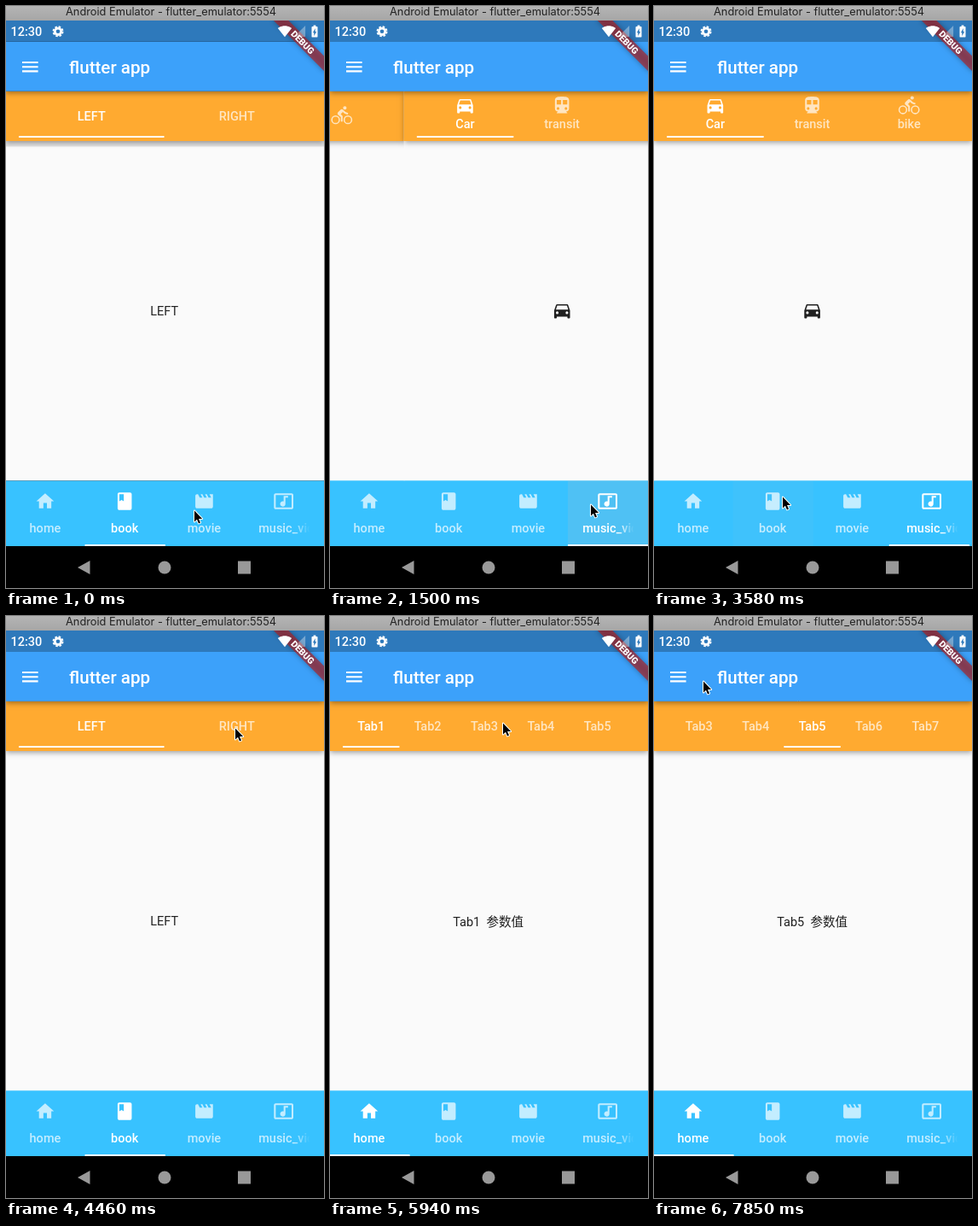
Recreate the animation shown at these times as an HTML page with a canvas. Size 373 by 681 pixels, loop 8 s.

```html
<!DOCTYPE html>
<html lang="en">
<head>
<meta charset="utf-8">
<title>flutter app</title>
<style>
html, body { margin: 0; width: 100%; height: 100%; overflow: hidden; background: #000 }
canvas { display: block; width: 373px; height: 681px }
</style>
</head>
<body>
<canvas></canvas>
<script>
const LOOP = 8000, TICK = 148.1, SLIDE = 300, PAGE_LAG = 150;
const W = 372, MID = 185.6, BAR_X = 15, BAR_W = 341, BAR_Y = 99.7, BODY_Y = 158, NAV_Y = 555.5, DOCK_Y = 632;
const FONT = 'Roboto, "Noto Sans CJK SC", "Noto Sans CJK", sans-serif';
const INK = '#202020';

const canvas = document.querySelector('canvas'), g = canvas.getContext('2d');
const ratio = window.devicePixelRatio || 1;
canvas.width = 373 * ratio;
canvas.height = 681 * ratio;

// Icons on a 24 x 24 grid
const icons = {
  home: 'M10 20v-6h4v6h5v-8h3L12 3 2 12h3v8z',
  book: 'M18 2H6c-1.1 0-2 .9-2 2v16c0 1.1.9 2 2 2h12c1.1 0 2-.9 2-2V4c0-1.1-.9-2-2-2zM6 4h5v8l-2.5-1.5L6 12z',
  movie: 'M18 4l2 4h-3l-2-4h-2l2 4h-3l-2-4H8l2 4H7L5 4H4c-1.1 0-2 .9-2 2v12c0 1.1.9 2 2 2h16c1.1 0 2-.9 2-2V4z',
  music_video: 'M21 3H3c-1.1 0-2 .9-2 2v14c0 1.1.9 2 2 2h18c1.1 0 2-.9 2-2V5c0-1.1-.9-2-2-2zm0 16H3V5h18zM8 15c0-1.66 1.34-3 3-3 .35 0 .69.07 1 .18V6h5v2h-3v7.03c-.02 1.64-1.35 2.97-3 2.97s-3-1.34-3-3z',
  Car: 'M18.92 6.01C18.72 5.42 18.16 5 17.5 5h-11c-.66 0-1.21.42-1.42 1.01L3 12v8c0 .55.45 1 1 1h1c.55 0 1-.45 1-1v-1h12v1c0 .55.45 1 1 1h1c.55 0 1-.45 1-1v-8zM5 14.5a1.5 1.5 0 1 0 3 0 1.5 1.5 0 1 0-3 0zm11 0a1.5 1.5 0 1 0 3 0 1.5 1.5 0 1 0-3 0zM5 11l1.5-4.5h11L19 11z',
  transit: 'M12 2c-4.42 0-8 .5-8 4v9.5C4 17.43 5.57 19 7.5 19L6 20.5v.5h12v-.5L16.5 19c1.93 0 3.5-1.57 3.5-3.5V6c0-3.5-3.58-4-8-4zM6 15.5a1.5 1.5 0 1 0 3 0 1.5 1.5 0 1 0-3 0zM11 11H6V6h5zm4 4.5a1.5 1.5 0 1 0 3 0 1.5 1.5 0 1 0-3 0zM18 11h-5V6h5z',
  bike: 'M13.5 3.5a2 2 0 1 0 4 0 2 2 0 1 0-4 0zM0 17a5 5 0 1 0 10 0 5 5 0 1 0-10 0zm1.5 0a3.5 3.5 0 1 1 7 0 3.5 3.5 0 1 1-7 0zM14 17a5 5 0 1 0 10 0 5 5 0 1 0-10 0zm1.5 0a3.5 3.5 0 1 1 7 0 3.5 3.5 0 1 1-7 0zM10.8 10.5l2.4-2.4.8.8c1.3 1.3 3 2.1 5.1 2.1V9c-1.5 0-2.7-.6-3.6-1.5l-1.9-1.9c-.5-.4-1-.6-1.6-.6s-1.1.2-1.4.6L7.8 8.4c-.4.4-.6.9-.6 1.4 0 .6.2 1.1.6 1.4L11 14v5h2v-6.2z',
  menu: 'M3 18h18v-2H3zm0-5h18v-2H3zm0-7v2h18V6z',
  wifi: 'M12 21.5L23.64 7C23.2 6.66 18.7 3 12 3S.81 6.66.36 7z',
  signal: 'M2 22h20V2z',
  battery: 'M15.67 4H14V2h-4v2H8.33C7.6 4 7 4.6 7 5.33v15.33C7 21.4 7.6 22 8.33 22h7.33c.74 0 1.34-.6 1.34-1.33V5.33C17 4.6 16.4 4 15.67 4zM11 20v-5.5H9L13 7v5.5h2z'
};
for (const name in icons) icons[name] = new Path2D(icons[name]);
const arrow = new Path2D('M0 0V13L3 10.2 5 14.9 7 14 5 9.4H9.1z');

// Each track: [tap time, chosen index]
const sections = ['home', 'book', 'movie', 'music_video'];
const sectionTaps = [[-LOOP, 1], [150, 2], [1206, 3], [3560, 1], [5215, 0]];
const rides = ['Car', 'transit', 'bike'];
const pages = [
  { tabs: Array.from({ length: 8 }, (_, i) => 'Tab' + (i + 1)), size: 66.4, taps: [[-LOOP, 0], [6140, 2], [7410, 4]] },
  { tabs: ['LEFT', 'RIGHT'], taps: [[-LOOP, 0], [4600, 1]] },
  { tabs: rides, icon: true, taps: [[-LOOP, 0]] },
  { tabs: rides, icon: true, label: true, taps: [[-LOOP, 0], [2077, 1], [2480, 2], [2880, 0]] }
];
// time, x, y of the pointer
const pointer = [
  [0, 220, 589], [450, 220, 589], [1000, 305, 582], [1550, 305, 582], [2020, 190, 141], [2200, 192, 141],
  [2385, 256, 141], [2450, 285, 138], [2560, 285, 138], [2800, 80, 138], [2960, 80, 138], [3280, 140, 592],
  [3500, 150, 573], [3700, 150, 573], [4300, 268, 130], [4700, 268, 130], [5150, 46, 582], [5300, 46, 582],
  [5640, 226, 150], [5939, 202, 124], [6350, 202, 124], [6850, 350, 126], [7260, 336, 130], [7540, 336, 130],
  [7850, 57, 75], [LOOP, 57, 75]
];

const clamp = v => Math.max(0, Math.min(1, v));
const mix = (a, b, k) => a + (b - a) * k;

// cubic-bezier(.25, .1, .25, 1)
function ease(x) {
  if (x <= 0 || x >= 1) return clamp(x);
  let lo = 0, hi = 1, u;
  for (let i = 0; i < 20; i++) {
    u = (lo + hi) / 2;
    if (.75 * u * (1 - u) + u ** 3 < x) lo = u; else hi = u;
  }
  return .3 * u * (1 - u) ** 2 + 3 * u * u * (1 - u) + u ** 3;
}

function follow(taps, t) {
  let i = taps.length - 1;
  while (taps[i][0] > t) i--;
  const [at, to] = taps[i], from = i ? taps[i - 1][1] : to;
  const next = taps[i + 1];
  const glow = c => Math.min(clamp((t - c + 20) / 100), clamp((c + 430 - t) / 130));
  const early = next && t > next[0] - 20;
  return {
    from, to,
    mark: ease((t - at) / SLIDE),
    page: ease((t - at - PAGE_LAG) / SLIDE),
    hot: early ? next[1] : to,
    glow: early ? glow(next[0]) : glow(at)
  };
}

function rect(x, y, w, h, color) {
  g.fillStyle = color;
  g.fillRect(x, y, w, h);
}

function text(str, x, y, font, color, align = 'center') {
  g.font = font;
  g.textAlign = align;
  g.fillStyle = color;
  g.fillText(str, x, y);
}

function icon(name, x, y, color, scale = 31 / 30) {
  g.save();
  g.translate(x, y);
  g.scale(scale, scale);
  g.translate(-12, -12);
  g.fillStyle = color;
  g.fill(icons[name], 'evenodd');
  g.restore();
}

function clipped(x, y, w, h, draw) {
  g.save();
  g.beginPath();
  g.rect(x, y, w, h);
  g.clip();
  draw();
  g.restore();
}

function raised(x, y, w, h, color) {
  g.save();
  g.shadowColor = 'rgba(0,0,0,.36)';
  g.shadowBlur = 6 * ratio;
  g.shadowOffsetY = 2 * ratio;
  rect(x, y, w, h, color);
  g.restore();
}

// Strength of a tab's white while the choice moves
function tint(s, i) {
  const on = (s.to === i ? s.mark : 0) + (s.from === i ? 1 - s.mark : 0);
  return `rgba(255,255,255,${.7 + .3 * clamp(on)})`;
}

const pressed = s => `rgba(188,188,188,${.17 * s.glow})`;

// Two neighbours pass by, the lower index painted first
function slide(s, draw) {
  if (s.from === s.to || s.page === 1) return draw(s.to, 0);
  const dir = Math.sign(s.to - s.from);
  const views = [[s.from, -dir * W * s.page], [s.to, dir * W * (1 - s.page)]];
  views.sort((a, b) => a[0] - b[0]).forEach(v => draw(...v));
}

function drawTabs(page, s) {
  const size = page.size || BAR_W / page.tabs.length;
  const scrollOf = i => page.size ? Math.max(0, BAR_X + (i + .5) * size - MID) : 0;
  const scroll = mix(scrollOf(s.from), scrollOf(s.to), s.mark);
  clipped(BAR_X, BAR_Y, BAR_W, 58, () => {
    g.translate(BAR_X - scroll, 0);
    rect(s.hot * size, 103.8, size, 48.2, pressed(s));
    page.tabs.forEach((name, i) => {
      const x = (i + .5) * size, color = tint(s, i);
      if (page.icon) icon(name, x, page.label ? 116.3 : 128, color);
      if (!page.icon || page.label) text(name, x, page.label ? 143 : 133.6, '500 14.5px ' + FONT, color);
    });
    rect(mix(s.from, s.to, s.mark) * size, 152, size, 2, '#fff');
  });
}

function drawPage(page, x, t) {
  const s = follow(page.taps, t);
  g.save();
  g.translate(x, 0);
  rect(0, BAR_Y, W + 1, NAV_Y - BAR_Y, '#fafafa');
  clipped(0, BODY_Y, W + 1, NAV_Y - BODY_Y, () => slide(s, (i, dx) => {
    const name = page.tabs[i];
    if (page.icon) icon(name, MID + dx, 356.3, INK);
    else text(page.size ? name + '\u00a0\u00a0参数值' : name, MID + dx, page.size ? 362.5 : 362, '14.5px ' + FONT, INK);
  }));
  raised(0, BAR_Y, W + 1, BODY_Y - BAR_Y, '#ffaa30');
  drawTabs(page, s);
  g.restore();
}

function drawSections(s) {
  const size = 373 / 4;
  rect(0, NAV_Y, 373, DOCK_Y - NAV_Y, '#38c2ff');
  g.save();
  g.translate(-.7, 0);
  rect(s.hot * size, NAV_Y, size + 1, DOCK_Y - NAV_Y, pressed(s));
  sections.forEach((name, i) => {
    const x = (i + .5) * size, color = tint(s, i);
    icon(name, x, 579.5, color);
    if (i < 3) return text(name, x, 615.5, '500 14.5px ' + FONT, color);
    const fade = g.createLinearGradient(339, 0, 357, 0);
    fade.addColorStop(0, color);
    fade.addColorStop(1, 'rgba(255,255,255,0)');
    text(name, 296.9, 615.5, '500 14.5px ' + FONT, fade, 'left');
  });
  rect(mix(s.from, s.to, s.mark) * size, DOCK_Y - 2, size + 1, 2, '#fff');
  g.restore();
}

function ring(x, y, r, width, dash = []) {
  g.beginPath();
  g.arc(x, y, r, 0, 7);
  g.lineWidth = width;
  g.strokeStyle = '#fff';
  g.setLineDash(dash);
  g.stroke();
  g.setLineDash([]);
}

function drawTop() {
  raised(0, 41.8, 373, BAR_Y - 41.8, '#3ca1fa');
  rect(0, 17, 373, 24.8, '#2e79bb');
  icon('menu', 28.3, 71.2, '#fff');
  text('flutter app', 74, 79, '500 20.6px ' + FONT, '#fff', 'left');

  g.save();
  g.translate(373, 17.7);
  g.rotate(Math.PI / 4);
  g.shadowColor = 'rgba(0,0,0,.5)';
  g.shadowBlur = 6 * ratio;
  rect(-43, 28.9, 86, 12.4, 'rgba(183,28,28,.63)');
  g.shadowColor = 'transparent';
  text('DEBUG', 0, 38.9, '900 10.5px ' + FONT, '#fff');
  g.restore();

  text('12:30', 5.5, 35, '500 14.5px ' + FONT, '#fff', 'left');
  ring(61, 29.8, 3.7, 2.8);
  ring(61, 29.8, 5.6, 1.8, [2.6, 1.798]);
  icon('wifi', 327, 29.5, '#fff', .7);
  icon('signal', 344.5, 29.5, 'rgba(255,255,255,.35)', .66);
  icon('battery', 362, 29.6, '#fff', .7);

  const steel = g.createLinearGradient(0, 0, 0, 17);
  steel.addColorStop(0, '#b4b4b4');
  steel.addColorStop(1, '#a6a6a6');
  rect(0, 0, 373, 17, steel);
  text('Android Emulator - flutter_emulator:5554', 193.5, 11, '12.8px Inter, "Liberation Sans", sans-serif', '#222');
}

function drawDock() {
  rect(0, DOCK_Y, 373, 50, '#000');
  g.fillStyle = '#999';
  g.beginPath();
  g.moveTo(84, 657);
  g.lineTo(98.5, 649);
  g.lineTo(98.5, 665);
  g.fill();
  g.beginPath();
  g.arc(186, 657, 7.5, 0, 7);
  g.fill();
  g.fillRect(272, 649.5, 15, 15);
}

function drawPointer(t) {
  let i = 0;
  while (i < pointer.length - 2 && pointer[i + 1][0] <= t) i++;
  const [a, x0, y0] = pointer[i], [b, x1, y1] = pointer[i + 1];
  const u = clamp((t - a) / (b - a)), k = u * u * (3 - 2 * u);
  g.save();
  g.translate(mix(x0, x1, k) + 1, mix(y0, y1, k) + 1.5);
  g.lineWidth = 2;
  g.lineJoin = 'round';
  g.strokeStyle = '#fff';
  g.stroke(arrow);
  g.fillStyle = '#000';
  g.fill(arrow);
  g.restore();
}

function draw(t) {
  const s = follow(sectionTaps, t);
  g.setTransform(ratio, 0, 0, ratio, 0, 0);
  slide(s, (i, x) => drawPage(pages[i], x, t));
  if (t < TICK) rect(0, 158, 373, 6.5, 'rgba(0,0,0,.1)');
  drawTop();
  drawSections(s);
  drawDock();
  drawPointer(t);
}

let start;
function frame(now) {
  start ??= now;
  // The screen refreshes in coarse steps
  const step = Math.floor((now - start) % LOOP / TICK);
  draw(Math.min(step * TICK + 15, LOOP));
  requestAnimationFrame(frame);
}
requestAnimationFrame(frame);
</script>
</body>
</html>
```
